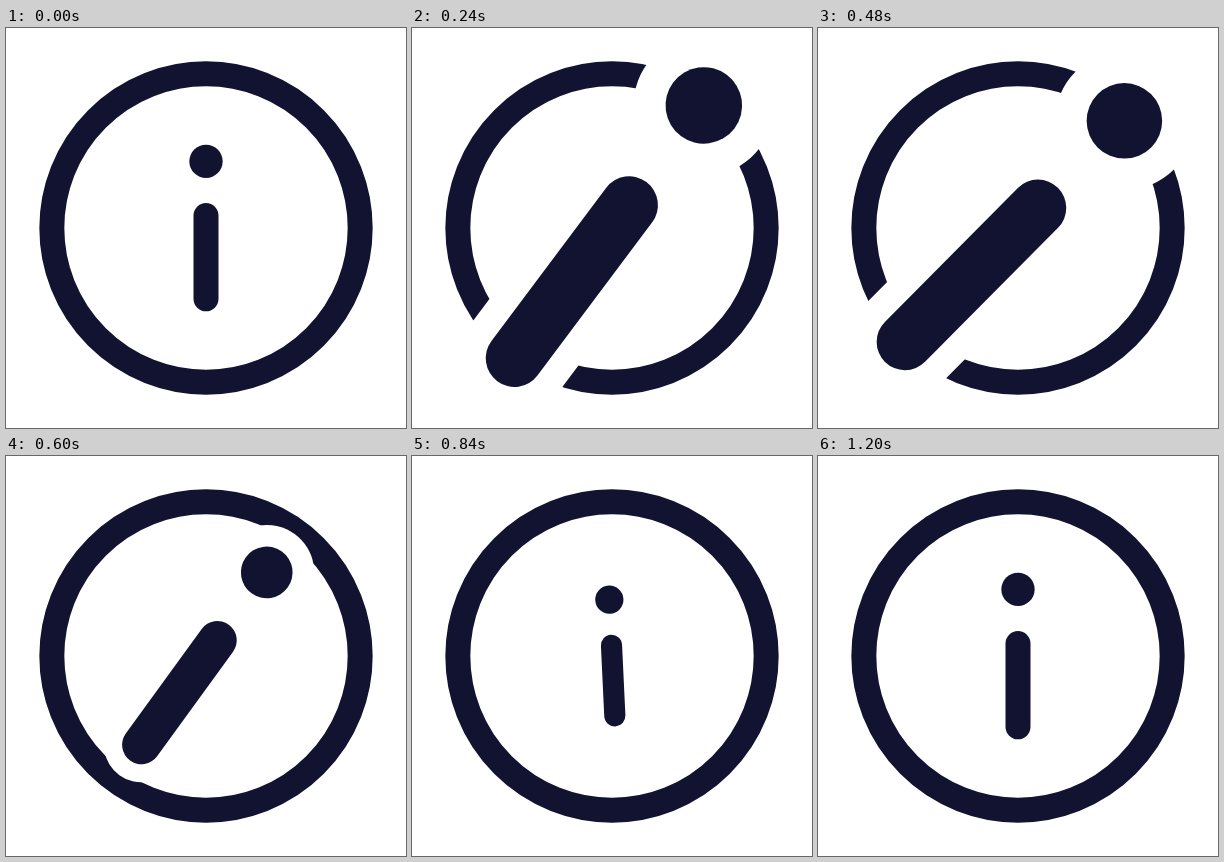
Animation of 400x400 px, one loop 3230 ms. Source, as an HTML page:

```html
<!DOCTYPE html>
<html lang="en">
<head>
<meta charset="utf-8">
<title>Info icon</title>
<style>
  html, body { margin: 0; width: 100%; height: 100%; overflow: hidden; background: #fff; }
  svg { display: block; width: 100%; height: 100%; }
</style>
</head>
<body>
<svg viewBox="0 0 400 400">
  <mask id="gap" maskUnits="userSpaceOnUse" x="0" y="0" width="400" height="400">
    <rect width="400" height="400" fill="#fff"/>
    <g class="mark" stroke-linecap="round">
      <circle cy="-66.67" r="30.6"/>
      <path d="M0-12.5V70.83" stroke="#000" stroke-width="48.4"/>
    </g>
  </mask>
  <g mask="url(#gap)">
    <circle cx="200" cy="200" r="154.17" fill="none" stroke="#121331" stroke-width="25"/>
  </g>
  <g class="mark" fill="#121331" stroke-linecap="round">
    <circle cy="-66.67" r="16.67"/>
    <path d="M0-12.5V70.83" stroke="#121331" stroke-width="25"/>
  </g>
</svg>
<script>
  const LOOP = 3230, STEP = 30, END = 1200;
  const SMOOTH = [1 / 3, 0, 2 / 3, 1];

  // [time, value, easing towards the next key]
  const TURN = [
    [0, 0, [0.415, 0, 0.1, 1]],
    [480, 44.8, SMOOTH],
    [960, -11.5, SMOOTH],
    [END, 0]
  ];
  const SCALE = [
    [0, 1, SMOOTH],
    [240, 2.297, SMOOTH],
    [480, 2.265, SMOOTH],
    [720, 0.835, [0.58, 0, 0.8, 1]],
    [END, 1]
  ];

  const cubic = (a, b, u) => 3 * (1 - u) * (1 - u) * u * a + 3 * (1 - u) * u * u * b + u * u * u;

  function ease([x1, y1, x2, y2], x) {
    let lo = 0, hi = 1;
    for (let i = 0; i < 24; i++) {
      const mid = (lo + hi) / 2;
      if (cubic(x1, x2, mid) < x) lo = mid; else hi = mid;
    }
    return cubic(y1, y2, (lo + hi) / 2);
  }

  function valueAt(keys, t) {
    const i = keys.findIndex(k => k[0] > t);
    if (i < 0) return keys[keys.length - 1][1];
    const [t0, v0, curve] = keys[i - 1];
    const [t1, v1] = keys[i];
    return v0 + (v1 - v0) * ease(curve, (t - t0) / (t1 - t0));
  }

  const marks = document.querySelectorAll('.mark');

  function draw() {
    const now = performance.now() % LOOP;
    const t = Math.min(END, Math.floor(now / STEP) * STEP);
    const pose = `translate(200 200) rotate(${valueAt(TURN, t)}) scale(${valueAt(SCALE, t)})`;
    marks.forEach(m => m.setAttribute('transform', pose));
    requestAnimationFrame(draw);
  }
  draw();
</script>
</body>
</html>
```
